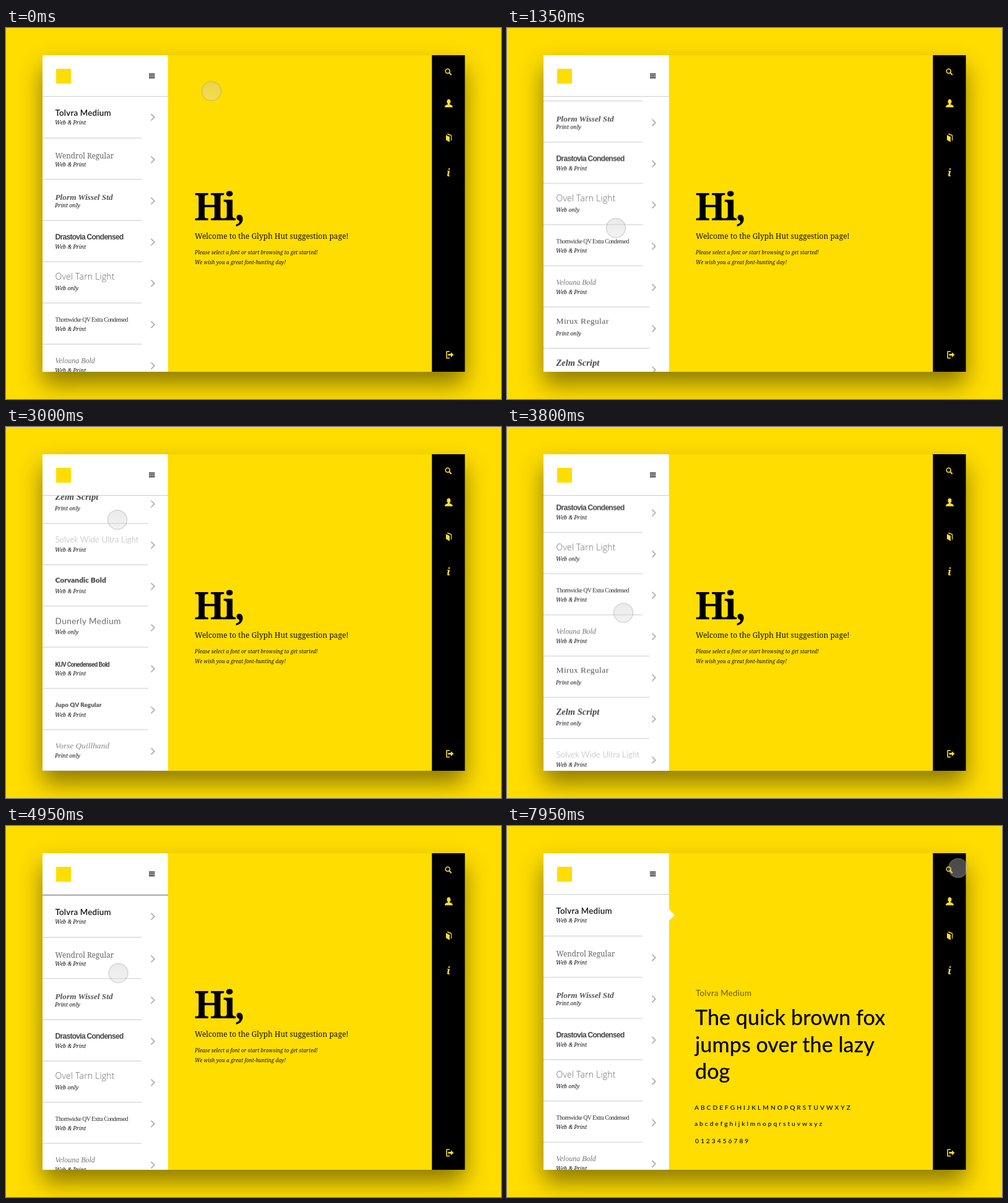
An HTML page for the animation above (8000 ms loop, 800 px wide and 600 px high).

```html
<!DOCTYPE html>
<html lang="en">
<head>
<meta charset="utf-8">
<title>Font suggestion page</title>
<style>
html, body { margin: 0; width: 100%; height: 100%; overflow: hidden; background: #fd0; }
.shadow { position: absolute; left: 59px; top: 44px; width: 682px; height: 512px;
  box-shadow: 0 20px 36px rgba(0, 0, 0, .45); }
svg { position: absolute; left: 0; top: 0; width: 800px; height: 600px; }
text { white-space: pre; }
.serif { font-family: "Noto Serif", serif; }
.note { font-family: "Noto Serif", serif; font-style: italic; font-size: 8.9px; fill: #111; }
.geo { font-family: Lato, sans-serif; font-weight: 500; }
.glyphs { font-size: 10.3px; letter-spacing: 2.95px; }
.chevron { fill: none; stroke: #b5b5b5; stroke-width: 2; }

#list, #cursor, #hello, #specimen, #notch, .picked {
  animation: 8s linear infinite both;
}
#list { animation-name: scroll; }
#cursor { animation-name: roam; }
#hello, .picked { animation-name: leave; }
#specimen { animation-name: enter; }
#notch { animation-name: poke; }

@keyframes scroll {
  0%, 11.5% { transform: translateY(0); animation-timing-function: cubic-bezier(.4, 0, .8, .65); }
  16.875% { transform: translateY(-126px); animation-timing-function: cubic-bezier(.3, .4, .4, 1); }
  27.5% { transform: translateY(-566.8px); animation-timing-function: ease-in-out; }
  31%, 39% { transform: translateY(-555.3px); animation-timing-function: cubic-bezier(.5, 0, .8, .65); }
  47.5% { transform: translateY(-208px); animation-timing-function: cubic-bezier(.25, .5, .4, 1); }
  59% { transform: translateY(6px); animation-timing-function: ease-in-out; }
  61.875% { transform: translateY(2px); animation-timing-function: ease-out; }
  64%, 100% { transform: translateY(0); }
}
@keyframes roam {
  0% { transform: translate(332px, 102px); animation-timing-function: ease-in-out; }
  10.5%, 11.5% { transform: translate(180px, 450px); animation-timing-function: cubic-bezier(.4, 0, .8, .65); }
  16.875% { transform: translate(176px, 324px); animation-timing-function: ease-out; }
  21% { transform: translate(172px, 215px); animation-timing-function: ease-in-out; }
  27.5% { transform: translate(168px, 260px); animation-timing-function: ease-in-out; }
  37%, 39% { transform: translate(180px, 150px); animation-timing-function: cubic-bezier(.5, 0, .8, .65); }
  47.5% { transform: translate(188px, 300px); animation-timing-function: ease-out; }
  52% { transform: translate(190px, 390px); animation-timing-function: ease-in-out; }
  61.875% { transform: translate(181.5px, 238px); animation-timing-function: ease-out; }
  71%, 85% { transform: translate(193px, 133px); animation-timing-function: ease-in-out; }
  97.5%, 100% { transform: translate(729px, 68px); }
}
@keyframes leave {
  0%, 73% { opacity: 1; }
  75%, 100% { opacity: 0; }
}
@keyframes enter {
  0%, 74% { opacity: 0; }
  76.5%, 100% { opacity: 1; }
}
@keyframes poke {
  0%, 73.5% { transform: translateX(-11px); animation-timing-function: ease-out; }
  76%, 100% { transform: translateX(0); }
}
</style>
</head>
<body>
<div class="shadow"></div>
<svg viewBox="0 0 800 600">
  <clipPath id="listArea"><rect x="59" y="111" width="202.67" height="445"/></clipPath>
  <linearGradient id="glass" x1="0" y1="0" x2="0" y2="1">
    <stop offset="0" stop-color="#c6c6c6"/>
    <stop offset="1" stop-color="#dedede"/>
  </linearGradient>

  <rect x="59" y="44" width="682.67" height="512" fill="#fd0"/>

  <g id="hello" class="serif">
    <text x="304" y="311" font-size="61" font-weight="700" letter-spacing="-3.2">Hi,</text>
    <text x="305" y="340.5" font-size="12.05" fill="#111">Welcome to the Glyph Hut suggestion page!</text>
    <g font-size="8.3" font-style="italic" font-weight="500" fill="#111">
      <text x="305" y="366">Please select a font or start browsing to get started!</text>
      <text x="305" y="382">We wish you a great font-hunting day!</text>
    </g>
  </g>

  <g id="specimen" class="geo">
    <text x="305" y="275" font-size="13.4" letter-spacing=".2" opacity=".55">Tolvra Medium</text>
    <g font-size="34.2">
      <text x="304" y="322">The quick brown fox</text>
      <text x="304" y="365.5">jumps over the lazy</text>
      <text x="304" y="408.5">dog</text>
    </g>
    <g class="glyphs">
      <text x="303" y="459">ABCDEFGHIJKLMNOPQRSTUVWXYZ</text>
      <text x="303" y="485">abcdefghijklmnopqrstuvwxyz</text>
      <text x="304" y="513">0123456789</text>
    </g>
  </g>

  <path id="notch" d="M261 134l10 10-10 10z" fill="#fff"/>

  <g clip-path="url(#listArea)">
    <rect x="59" y="111" width="203" height="445" fill="#b3b3b3"/>
    <g id="list"><rect x="59" y="111" width="203" height="1000.3" fill="#fff"/></g>
  </g>

  <rect x="59" y="44" width="202.67" height="66" fill="#fff"/>
  <rect x="59" y="110" width="202.67" height="1.2" fill="#d2d2d2"/>
  <rect x="81" y="66" width="24" height="24" fill="#fd0"/>
  <path d="M231 74.5h9.5M231 77.5h9.5M231 80.5h9.5" stroke="#000" stroke-width="1.7"/>

  <rect x="688.33" y="44" width="53.33" height="512" fill="#000"/>
  <g fill="none" stroke="#fedf2a" stroke-width="1.6">
    <circle cx="713.8" cy="69.8" r="3.5"/>
    <path d="M716.4 72.4l3.4 3.6" stroke-width="2"/>
    <path d="M717 523.3h-4.8v10.4h4.8"/>
  </g>
  <g fill="#fedf2a">
    <ellipse cx="715.5" cy="119" rx="3" ry="3.8"/>
    <path d="M714 121h3v2.6q5 1.2 5 4.6h-13q0-3.4 5-4.6z"/>
    <path d="M711 173l6 3v8.5l-6-3.5z"/>
    <path d="M711.5 172l3-1.2 5.7 2.4v8.6l-1.2.5v-8l-6-2.4z"/>
    <path d="M714.5 527h4.5v-2.6l4.5 4-4.5 4v-2.6h-4.5z"/>
    <text class="serif" x="712" y="240" font-size="17" font-weight="700" font-style="italic">i</text>
  </g>

  <g id="cursor">
    <circle r="15.5" fill="url(#glass)" fill-opacity=".36" stroke="#969696" stroke-opacity=".36" stroke-width="1.5"/>
  </g>
</svg>
<script>
const SVG = 'http://www.w3.org/2000/svg';
const STEP = 200 / 3;
const list = document.getElementById('list');

const families = {
  lato: 'Lato, sans-serif',
  noto: '"Noto Serif", serif',
  times: '"Liberation Serif", serif',
  arial: '"Liberation Sans", sans-serif',
  open: '"Open Sans", sans-serif',
  roboto: 'Roboto, sans-serif'
};

// name, use, baseline above the note's middle, family, style and size, colour, letter-spacing
const fonts = [
  ['Tolvra Medium', 'Web & Print', 10.5, 'lato', '500 13.4px', '#000', .2],
  ['Wendrol Regular', 'Web & Print', 9, 'noto', '400 11.7px', '#666', 0],
  ['Plorm Wissel Std', 'Print only', 9, 'times', 'italic 700 13.3px', '#555', 0],
  ['Drastovia Condensed', 'Web & Print', 12, 'arial', '700 12px', '#444', -.7],
  ['Ovel Tarn Light', 'Web only', 13, 'open', '300 14px', '#666', .2],
  ['Thornwicke QV Extra Condensed', 'Web & Print', 12.2, 'times', '400 10px', '#333', -.65],
  ['Velouna Bold', 'Web & Print', 12.2, 'times', 'italic 400 12px', '#777', 0],
  ['Mirux Regular', 'Print only', 15, 'times', '400 13.5px', '#555', .4],
  ['Zelm Script', 'Print only', 14.5, 'times', 'italic 700 14.5px', '#444', 0],
  ['Solvek Wide Ultra Light', 'Web & Print', 12.2, 'lato', '300 13.1px', '#aaa', .1],
  ['Corvandic Bold', 'Web & Print', 13, 'lato', '900 12px', '#444', 0],
  ['Dunerly Medium', 'Web only', 13, 'lato', '400 13.5px', '#666', .5],
  ['KUV Conedensed Bold', 'Web & Print', 10.5, 'roboto', '700 10px', '#444', -.7],
  ['Jupo QV Regular', 'Web & Print', 12.3, 'lato', '900 10px', '#555', 0],
  ['Vorse Quillhand', 'Print only', 12.5, 'times', 'italic 400 13.4px', '#888', 0]
];

function add(tag, attributes, content = '') {
  const node = document.createElementNS(SVG, tag);
  for (const key in attributes) node.setAttribute(key, attributes[key]);
  node.textContent = content;
  list.append(node);
  return node;
}

fonts.forEach(([name, use, rise, family, face, fill, spacing], i) => {
  const y = i * STEP;
  const noteY = i ? 153.7 + y : 152.5;
  const title = add('text', { x: 79.5, y: noteY - rise, fill, 'letter-spacing': spacing }, name);
  title.style.font = `${face} ${families[family]}`;
  add('text', { class: 'note', x: 79, y: noteY + 3.2 }, use);
  add('path', {
    class: i ? 'chevron' : 'chevron picked',
    d: `M234.5 ${(i ? 146.3 + y : 144.3) - 5.3}l5.3 5.3-5.3 5.3`
  });
  add('rect', { x: 59, y: 177.3 + y, width: i < 6 ? 160 : 171, height: 1.4, fill: '#d8d8d8' });
});
</script>
</body>
</html>
```
